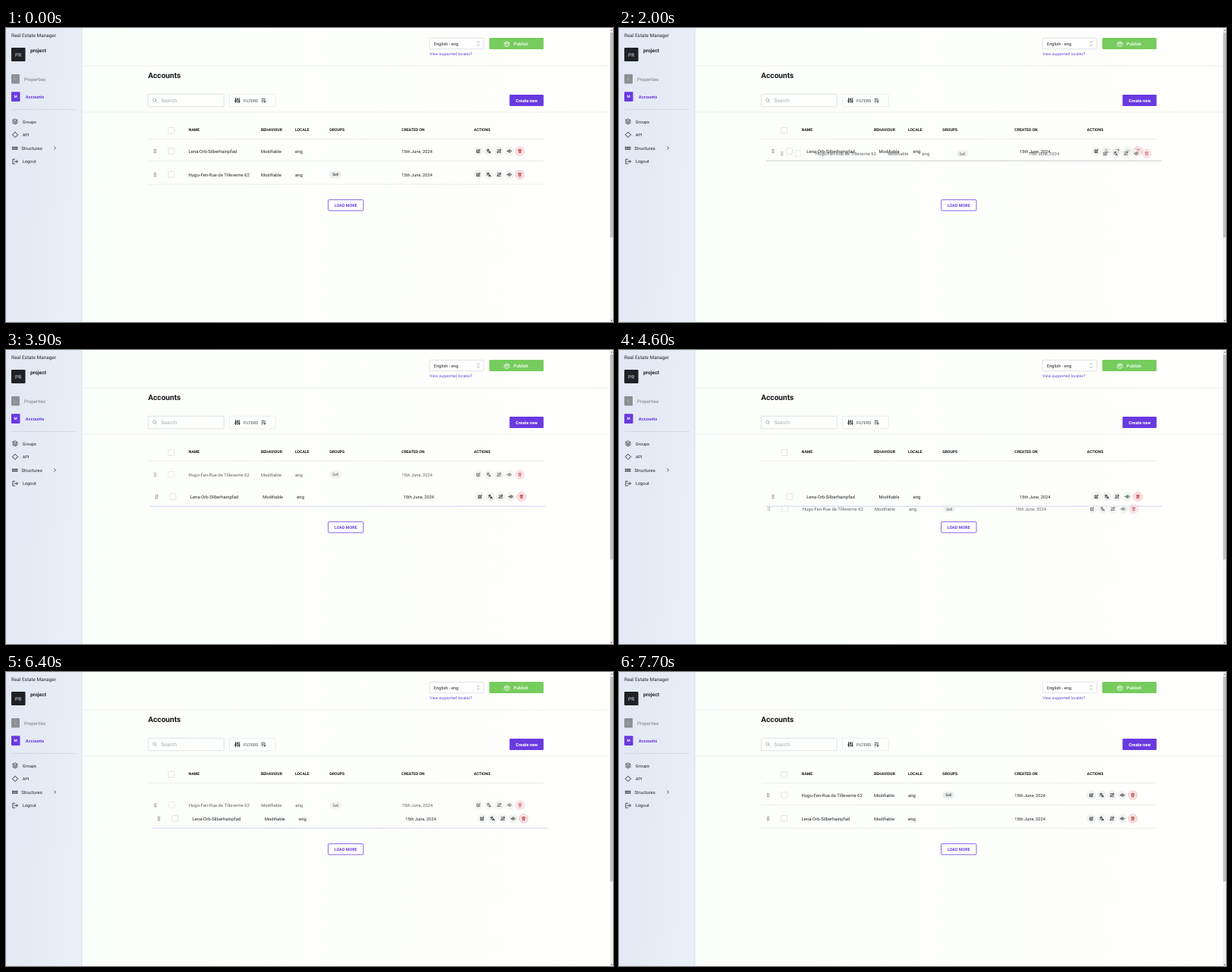
An HTML page for the animation above (8000 ms loop, 800 by 388 pixels).

```html
<!DOCTYPE html>
<html lang="en">
<head>
<meta charset="utf-8">
<title>Accounts</title>
<style>
  html, body { margin: 0; width: 100%; height: 100%; overflow: hidden; background: #fcfffb; }
  svg { display: block; width: 100vw; height: 100vh; }
  text { font-family: Roboto, "Open Sans", sans-serif; font-size: 5.75px; fill: #25272b; text-rendering: geometricPrecision; }
  .head text { font-size: 5.1px; font-weight: 700; fill: #151619; }
  .line { stroke: #e8ebea; stroke-width: .8; }
  .ico { fill: none; stroke: #24262a; stroke-width: .8; stroke-linecap: round; stroke-linejoin: round; }
  .box { fill: #fff; fill-opacity: .6; stroke: #d4d7dc; stroke-width: .7; }
  .bold { font-weight: 600; }
</style>
</head>
<body>
<svg viewBox="0 0 800 388" preserveAspectRatio="none">
  <defs>
    <linearGradient id="page">
      <stop offset="0" stop-color="#f9fffa"/><stop offset=".5" stop-color="#fcfffb"/><stop offset="1" stop-color="#fffefc"/>
    </linearGradient>
    <linearGradient id="side" x2="1" y2=".25">
      <stop offset="0" stop-color="#e2e8f4"/><stop offset="1" stop-color="#e9eff6"/>
    </linearGradient>
  </defs>

  <rect width="800" height="388" fill="url(#page)"/>

  <g id="sidebar">
    <rect width="100" height="388" fill="url(#side)"/>
    <path d="M100 0V388" stroke="#d3d9df" stroke-width=".8"/>
    <text x="7" y="12.2" style="font-size:6.42px">Real Estate Manager</text>
    <rect x="7" y="26" width="18.5" height="18" rx="1" fill="#1f2125"/>
    <text x="16.2" y="37.6" text-anchor="middle" style="font-size:6.6px;fill:#d7d9dc">PR</text>
    <text x="32" y="32.2" style="font-size:6.7px;font-weight:700">project</text>
    <rect x="7" y="61" width="11" height="12.5" rx="1" fill="#8d9095"/>
    <text x="12.5" y="69" text-anchor="middle" style="font-size:4.6px;fill:#c9ccd0">L</text>
    <text x="24" y="69.7" style="font-size:6.1px;fill:#75797f">Properties</text>
    <rect x="7" y="84.3" width="11.5" height="12.7" rx="1" fill="#693ae0"/>
    <text x="12.7" y="92.4" text-anchor="middle" style="font-size:4.8px;fill:#fff" class="bold">M</text>
    <text x="25.8" y="93" class="bold" style="fill:#693ae0">Accounts</text>
    <path d="M7 107.5H93" stroke="#cdd4dd" stroke-width=".7"/>
    <g class="ico">
      <path d="M12 120.2l3.2 1.5-3.2 1.5-3.2-1.5zM8.8 123.5l3.2 1.5 3.2-1.5M8.8 125.3l3.2 1.5 3.2-1.5"/>
      <path d="M12 137.4l1.8 1.8M12 137.4l-1.8 1.8M12 144.4l1.8-1.8M12 144.4l-1.8-1.8M8.5 140.9l1.8-1.8M8.5 140.9l1.8 1.8M15.5 140.9l-1.8-1.8M15.5 140.9l-1.8 1.8"/>
      <path d="M8.6 157.5h1M11.2 157.5h1M13.8 157.5h1M8.6 159.7h1M11.2 159.7h1M13.8 159.7h1" stroke-width="1.6"/>
      <path d="M11.5 173.2H8.9v6h2.6M11 176.2h4.4M13.7 174.4l1.8 1.8-1.8 1.8M63.7 156.7l1.8 1.8-1.8 1.8"/>
    </g>
    <text x="21.7" y="125.6" style="font-size:5.7px">Groups</text>
    <text x="21.7" y="143.1" style="font-size:5.6px">API</text>
    <text x="20.3" y="160.9" style="font-size:6px">Structures</text>
    <text x="21.7" y="178.4" style="font-size:5.8px">Logout</text>
  </g>

  <g id="topbar">
    <path class="line" d="M100 50H796M100 111H796"/>
    <rect class="box" x="558.3" y="13.3" width="71.4" height="14.4" rx="1"/>
    <text x="564" y="22.8" style="font-size:5.7px">English - eng</text>
    <path class="ico" d="M621.1 19.2l1.3-1.4 1.3 1.4M621.1 22l1.3 1.4 1.3-1.4" style="stroke:#777;stroke-width:.6"/>
    <text x="558.2" y="35.7" style="font-size:5.2px;fill:#6b45d8">View supported locales?</text>
    <rect x="637" y="13" width="71.5" height="15" rx="1.2" fill="#76cc5d"/>
    <g class="ico" style="stroke:#fff;stroke-width:.7">
      <circle cx="660" cy="19" r="1.3"/><circle cx="657.4" cy="20" r=".8"/><circle cx="662.6" cy="20" r=".8"/>
      <path d="M658 23.8c0-3.2 4-3.2 4 0zM656.2 23c0-1 .5-1.4 1.3-1.4M663.8 23c0-1-.5-1.4-1.3-1.4"/>
    </g>
    <text x="669" y="22.8" style="font-size:5.8px;fill:#fff;font-weight:500">Publish</text>
  </g>

  <g id="tools">
    <text x="187.3" y="66" style="font-size:10.1px;font-weight:700;fill:#141518">Accounts</text>
    <rect class="box" x="187.4" y="87.3" width="99.8" height="16.5" rx="1"/>
    <g class="ico" style="stroke:#9a9da2;stroke-width:.7"><circle cx="195.6" cy="95" r="2"/><path d="M197.1 96.5l1.6 1.6"/></g>
    <text x="204.2" y="98" style="font-size:6.8px;fill:#a8acb2">Search</text>
    <rect class="box" x="294.4" y="87.3" width="60.8" height="16.5" rx="1" style="stroke:#e3e6e7"/>
    <path class="ico" d="M302.5 92.7v5.8M304.9 92.7v5.8M307.3 92.7v5.8M301.6 96.3h1.8M304 94.2h1.8M306.4 96.8h1.8" style="stroke-width:1"/>
    <text x="313" y="97.5" style="font-size:5.35px;fill:#45484d">FILTERS</text>
    <path class="ico" d="M337 93.6h2.6M337 95.6h2M337 97.6h1.3M341 93.2v4.8M339.8 96.8l1.2 1.3 1.2-1.3"/>
    <rect x="663.6" y="88" width="44.9" height="15" rx="1.2" fill="#693ae0"/>
    <text x="686.3" y="97.7" text-anchor="middle" class="bold" style="font-size:5.75px;fill:#fff">Create new</text>
  </g>

  <g class="head">
    <rect class="box" x="213.9" y="131.4" width="7.8" height="7.8" rx="1"/>
    <text x="240.8" y="135.7">NAME</text>
    <text x="336" y="135.7">BEHAVIOUR</text>
    <text x="381" y="135.7">LOCALE</text>
    <text x="426.2" y="135.7">GROUPS</text>
    <text x="521.3" y="135.7">CREATED ON</text>
    <text x="616.8" y="135.7">ACTIONS</text>
    <path class="line" d="M187.5 146.5H708.5"/>
  </g>

  <g id="rows"></g>

  <rect x="424.7" y="226.7" width="46.3" height="14.3" rx="1.2" fill="#fff" stroke="#693ae0" stroke-width=".8"/>
  <text x="447.8" y="235.9" text-anchor="middle" class="bold" style="font-size:5.4px;fill:#693ae0">LOAD MORE</text>

  <g id="scrollbar">
    <rect x="796" width="4" height="388" fill="#f1f1f1"/>
    <rect x="796.2" y="6" width="3.8" height="270.5" fill="#c0c1c1"/>
    <path d="M796.9 3.6l1.2-1.6 1.2 1.6zM796.9 385.6l1.2 1.6 1.2-1.6z" fill="#555"/>
  </g>
</svg>

<script>
const LOOP = 8000, STEP = 100;
const TOP = 162.5, LOW = 193.5, SHIFT = 6.6;

// Each drag: start, ghost gone, end, and ghost points [time, dx, y].
const drags = [
  { start: 1700, drop: 2500, end: 2900, first: 'jane', line: '#c3c4c8',
    path: [[1700, 2, LOW - 1], [2000, 18.3, 165.7], [2300, 20, 160]] },
  { start: 3900, drop: 4900, end: 5200, first: 'john', line: '#cdc6f1',
    path: [[3900, 0, TOP + 2], [4300, 1, 208], [4600, 1.1, 209.8], [4800, 1, 211]] },
  { start: 6300, drop: 6800, end: 7100, first: 'john', line: '#cdc6f1',
    path: [[6300, 0, TOP + 2], [6700, 1, 209]] }
];

const icons = [
  'M-.3-1.7H-2.1V2.1H1.7V.4M-.6.6L-.3-.5 1.8-2.4 2.5-1.7.5.3z',
  'M-2.4-1.7H.5M-1-2.4V-1.7M.1-1.7C-.3-.2-1.3.5-2.3.9M-1.8-.9C-1.3 0-.6.4.1.7M.1 2.5L1.3-.2 2.5 2.5M.5 1.6H2.1',
  'M-2.2-1.8H1.2C2.6-1.8 2.6 0 1.2 0H-1.1C-2.5 0-2.5 1.8-1.1 1.8H2.2M1.6-2.5L2.4-1.8 1.6-1.1M-2.2 2.2V1.4',
  'M-2.7 0C-1.4-2.2 1.4-2.2 2.7 0 1.4 2.2-1.4 2.2-2.7 0zM-.6 0A.6.6 0 1 0 .6 0 .6.6 0 1 0-.6 0',
  'M-2.1-1.6H2.1M-.8-1.6V-2.4H.8V-1.6M-1.6-1.6L-1.3 2.4H1.3L1.6-1.6M-.4-.4V1.2M.4-.4V1.2'
];

function actionIcon(d, i) {
  const last = i === icons.length - 1;
  return `<g transform="translate(${622.5 + 13.67 * i} 0)">
    <circle r="${last ? 5.8 : 5.6}" fill="${last ? '#fae4e5' : '#f4f6f4'}" stroke="${last ? '#dfa9ad' : '#e6e8e7'}" stroke-width=".6"/>
    <path class="ico" d="${d}" style="${last ? 'stroke:#c2303c;stroke-width:.7' : ''}"/></g>`;
}

function rowMarkup(name, locale, group) {
  const dots = [-2, 0, 2].map(y => `M195.6 ${y}h.01M197.4 ${y}h.01`).join('');
  const pill = group ? `<rect x="426.3" y="-4.5" width="15.8" height="9" rx="4.5" fill="#e8efee"/>
    <text x="434.2" y="1.9" text-anchor="middle" style="font-size:5px">${group}</text>` : '';
  return `<path class="ico" d="${dots}" style="stroke-width:1.1"/>
    <rect class="box" x="213.9" y="-4" width="7.8" height="7.8" rx="1"/>
    <text x="240.6" y="2.3" style="font-size:5.95px">${name}</text>
    <text x="336" y="2.3" style="font-size:5.75px">Modifiable</text>
    <text x="381" y="2.3" style="font-size:6px">${locale}</text>${pill}
    <text x="521.3" y="2.3" style="font-size:5.7px">15th June, 2024</text>
    ${icons.map(actionIcon).join('')}`;
}

document.getElementById('rows').innerHTML = `
  <path id="lineTop" class="line"/><path id="lineLow" class="line"/>
  <g id="jane">${rowMarkup('Lena-Orb-Silberhainpfad', 'eng')}</g>
  <g id="john">${rowMarkup('Hugo-Fen-Rue de Tilleverne 62', 'ang', 'Sell')}</g>`;

const [jane, john, lineTop, lineLow] = ['jane', 'john', 'lineTop', 'lineLow'].map(id => document.getElementById(id));
const clamp = v => Math.min(1, Math.max(0, v));
const easeOut = v => 1 - (1 - v) ** 3;

function along(path, t) {
  const i = path.findIndex(p => p[0] > t);
  if (i < 0) return path[path.length - 1].slice(1);
  if (i === 0) return path[0].slice(1);
  const a = path[i - 1], b = path[i], k = (t - a[0]) / (b[0] - a[0]);
  return [a[1] + (b[1] - a[1]) * k, a[2] + (b[2] - a[2]) * k];
}

function place(row, x, y, opacity = 1) {
  row.setAttribute('transform', `translate(${x} ${y})`);
  row.setAttribute('opacity', opacity);
}

function rule(line, y, x, color, show) {
  line.setAttribute('d', `M${187.5 + x} ${y}H${708.5 + x}`);
  line.style.stroke = color;
  line.style.display = show ? '' : 'none';
}

function render(time) {
  const t = Math.floor(time / STEP) * STEP;
  const drag = drags.find(d => t >= d.start && t < d.end);
  const janeFirst = drag ? drag.first === 'jane' : t < drags[0].end;
  let shift = 0;
  if (drag) {
    shift = SHIFT * easeOut(clamp((t - drag.start + 50) / 400)) * (1 - clamp((t - drag.end + 200) / 200));
    const [x, y] = along(drag.path, t);
    place(john, x, y, t < drag.drop ? .72 : 0);
  } else {
    place(john, 0, janeFirst ? LOW : TOP);
  }
  place(jane, shift, janeFirst ? TOP : LOW);
  const color = drag ? drag.line : '#e8ebea';
  rule(lineTop, 175.4, shift, color, !drag || janeFirst);
  rule(lineLow, 206.2, shift, color, !drag || !janeFirst);
}

function tick() {
  render(performance.now() % LOOP);
  requestAnimationFrame(tick);
}
tick();
</script>
</body>
</html>
```
